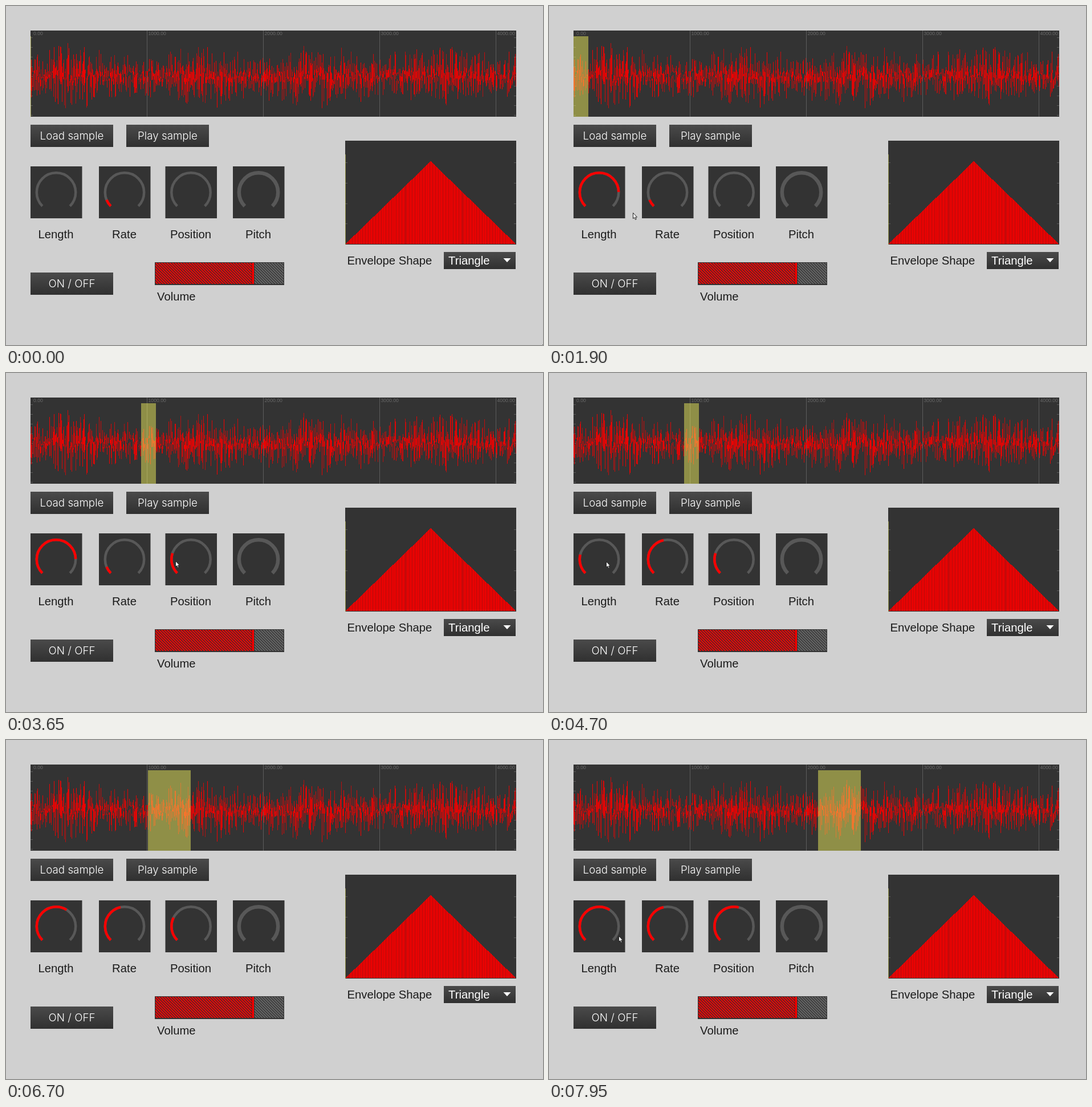
An HTML page with a canvas that plays this animation: 942x594 px, repeating every 8000 ms.

```html
<!DOCTYPE html>
<html lang="en">
<head>
<meta charset="utf-8">
<style>
  html, body { margin: 0; overflow: hidden; background: #d0d0d0; }
  canvas { display: block; }
</style>
</head>
<body>
<canvas id="stage" width="942" height="594"></canvas>
<script>
const stage = document.getElementById('stage');
const screen = stage.getContext('2d');
const backdrop = document.createElement('canvas');
backdrop.width = stage.width;
backdrop.height = stage.height;

const LOOP = 8000, WAVE_X = 43, WAVE_W = 852;
const RED = '#f80000', DARK = '#333', GREY = '#5c5c5c', YELLOW = 'rgba(255,255,96,.45)';
const LABEL = '20.3px "Liberation Sans", Arial, sans-serif';
const BUTTON = '300 18.8px Inter, sans-serif';
const SCALE = '8.7px "Liberation Sans", Arial, sans-serif';

// Knob drags in order: length, position, rate, length, position. The cursor is hidden meanwhile.
const drags = [[950, 1700], [2650, 3150], [4050, 4400], [4950, 5500], [6550, 7250]];

const moves = [
  { start: 50, end: 850, from: [941, 593], to: [70, 349], sag: 0 },
  { start: 1750, end: 2600, from: [72, 336], to: [304, 339], sag: 29 },
  { start: 3640, end: 3850, from: [306, 329], to: [207, 327], sag: 0 },
  { start: 4400, end: 4850, from: [207, 327], to: [87, 327], sag: 7 },
  { start: 6050, end: 6500, from: [87, 327], to: [304, 338], sag: 9 },
  { start: 7400, end: 7950, from: [323, 332], to: [122, 343], sag: 0 }
];

const ramp = (t, from, to) => Math.min(1, Math.max(0, (t - from) / (to - from)));
const smooth = p => p * p * (3 - 2 * p);
const easeOut = p => 1 - (1 - p) ** 2;
const lazy = p => p ** 1.3;

let seed = 41;
function random() {
  seed = (seed * 16807) % 2147483647;
  return seed / 2147483647;
}

function box(c, x, y, w, h, color) {
  c.fillStyle = color;
  c.fillRect(x, y, w, h);
}

function text(c, str, x, y, font, color, align = 'left') {
  c.font = font;
  c.fillStyle = color;
  c.textAlign = align;
  c.fillText(str, x, y);
}

function shadedBox(c, x, y, w, h) {
  const shade = c.createLinearGradient(0, y, 0, y + h);
  shade.addColorStop(0, '#4a4a4a');
  shade.addColorStop(1, '#303030');
  box(c, x, y, w, h, shade);
}

function button(c, label, x, y) {
  shadedBox(c, x, y, 145, 39);
  text(c, label, x + 72.5, y + 26, BUTTON, '#fff', 'center');
}

function arc(c, x, value, color, lineWidth = 4.5) {
  c.beginPath();
  c.arc(x, 326.5, 34.2, Math.PI * .75, Math.PI * (.75 + 1.5 * value));
  c.strokeStyle = color;
  c.lineWidth = lineWidth;
  c.stroke();
}

function ticks(c, left, right, top, bottom, step) {
  for (let y = top; y <= bottom; y += step) {
    box(c, left, Math.round(y), 4, 1, GREY);
    box(c, right - 4, Math.round(y), 4, 1, GREY);
  }
}

function drawWave(c) {
  box(c, WAVE_X, 43, WAVE_W, 151, DARK);
  for (let i = 0; i < 5; i++) {
    const x = WAVE_X + 204 * i;
    if (i) box(c, x, 43, 1, 151, GREY);
    text(c, (i * 1000).toFixed(2), x + (i ? 2.5 : 5), 51, SCALE, '#686868');
  }
  ticks(c, WAVE_X, 895, 55, 191, 17);
  for (let x = WAVE_X; x < 895; x++) {
    const gain = 42 + 9 * Math.cos((x - 120) / 210 * 2 * Math.PI);
    const middle = 122 + (random() - .5) * 20;
    const up = gain * random() ** 2.1, down = gain * random() ** 2.1;
    c.globalAlpha = .6 + .4 * random();
    box(c, x, Math.round(middle - up), 1, Math.round(up + down) + 1, RED);
  }
  c.globalAlpha = 1;
}

function drawEnvelope(c) {
  box(c, 595, 236, 300, 182, DARK);
  ticks(c, 595, 895, 274, 382, 35.8);
  box(c, 595, 260, 1, 158, YELLOW);
  for (let x = 596; x < 894; x++) {
    const h = Math.round(145 * (1 - Math.abs(x - 744.5) / 149.5));
    box(c, x, 417 - h, 1, h, (x * .39) % 1 < .4 ? '#b40c0c' : RED);
  }
}

function drawVolume(c) {
  box(c, 261, 449, 227, 40, DARK);
  box(c, 262, 450, 173, 37, RED);
  box(c, 436, 450, 51, 37, '#666');
  c.save();
  c.beginPath();
  c.rect(261, 449, 170, 40);
  c.rect(436, 449, 52, 40);
  c.clip();
  c.beginPath();
  for (let i = -32; i < 28; i++) {
    const x = 381 + 4.83 * i;
    c.moveTo(x - 20, 449);
    c.lineTo(x + 20, 489);
  }
  c.strokeStyle = DARK;
  c.lineWidth = 1.3;
  c.stroke();
  c.restore();
  box(c, 431, 450, 1, 37, '#900');
}

function drawBackdrop(c) {
  box(c, 0, 0, 942, 594, '#d0d0d0');
  drawWave(c);
  button(c, 'Load sample', 43, 208);
  button(c, 'Play sample', 211, 208);
  button(c, 'ON / OFF', 43, 467);
  [['Length', 88], ['Rate', 208], ['Position', 324.5], ['Pitch', 443]].forEach(([label, x]) => {
    box(c, x - 45, 281, 90.5, 91, DARK);
    arc(c, x, 1, '#585858', label === 'Pitch' ? 6.5 : 4.5);
    text(c, label, x - .5, 407, LABEL, '#1c1c1c', 'center');
  });
  drawVolume(c);
  text(c, 'Volume', 265, 516, LABEL, '#1c1c1c');
  drawEnvelope(c);
  text(c, 'Envelope Shape', 598.5, 453, LABEL, '#1c1c1c');
  shadedBox(c, 768, 431, 126, 30);
  text(c, 'Triangle', 776, 453, LABEL, '#fff');
  c.fill(new Path2D('M872.5 442H885.5L879 449Z'));
}

const arrow = new Path2D('M.5 .5V10.5L2.8 8.5L4.5 12.3L6.2 11.5L4.5 8H7.5Z');

function drawCursor(c, t) {
  if (drags.some(([from, to]) => t >= from && t < to)) return;
  const { start, end, from, to, sag } = moves.find(m => t < m.end + 100) || moves[moves.length - 1];
  const p = easeOut(ramp(t, start, end));
  const [x, y] = from.map((v, i) => v + (to[i] - v) * p);
  c.save();
  c.translate(Math.round(x), Math.round(y + 4 * sag * p * (1 - p)));
  c.fillStyle = '#fff';
  c.strokeStyle = '#222';
  c.lineWidth = 1;
  c.fill(arrow);
  c.stroke(arrow);
  c.restore();
}

function draw(t) {
  const c = screen;
  const [grow, seek, quicken, widen, seekOn] = drags.map(span => ramp(t, ...span));
  const width = 26.4 * easeOut(grow) + 48.6 * easeOut(widen);
  const offset = 194 * lazy(seek) + 235 * smooth(lazy(seekOn));
  const rate = .083 + .373 * smooth(quicken);
  const maxWidth = 12 + 239 * rate;
  // The position knob adopts the new grain width a moment after the drag.
  const room = WAVE_W - (t < 5750 ? 26.4 : 75);

  c.drawImage(backdrop, 0, 0);
  box(c, WAVE_X + Math.round(offset), 53, Math.max(1, Math.round(width)), 141, YELLOW);
  arc(c, 88, width / maxWidth, RED);
  arc(c, 208, rate, RED);
  arc(c, 324.5, offset / room, RED);
  drawCursor(c, t);
}

function frame() {
  draw(Math.floor(performance.now() % LOOP / 50) * 50);
  requestAnimationFrame(frame);
}

drawBackdrop(backdrop.getContext('2d'));
frame();
</script>
</body>
</html>
```
